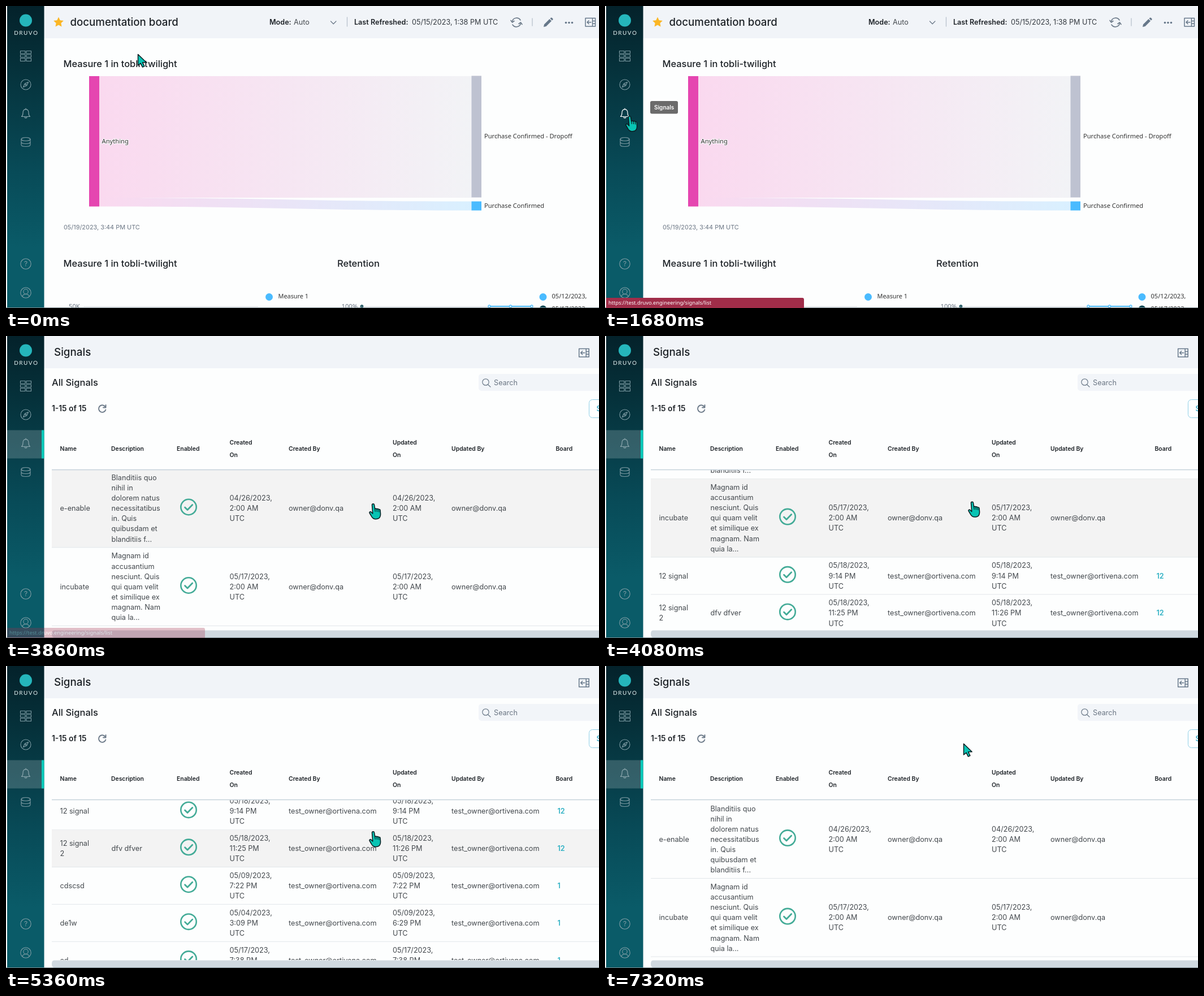
Animation, 1049 px wide and 534 px high, one loop 8300 ms. Source, as an HTML page:

```html
<!DOCTYPE html>
<html lang="en">
<head>
<meta charset="utf-8">
<title>Signals list</title>
<style>
html, body { margin: 0; width: 100%; height: 100%; overflow: hidden; background: #fff; }
svg { display: block; width: 100vw; height: 100vh; }
text { font-family: Inter, sans-serif; white-space: pre; }
.noto { font-family: "Noto Sans", "Open Sans", sans-serif; }
.line { fill: none; stroke-linecap: round; stroke-linejoin: round; }
</style>
</head>
<body>
<svg id="stage" viewBox="0 0 1049 534" xmlns="http://www.w3.org/2000/svg">
  <defs>
    <linearGradient id="side" x1="0" y1="0" x2="0" y2="1">
      <stop offset="0" stop-color="#04222b"/><stop offset=".15" stop-color="#052d36"/>
      <stop offset=".55" stop-color="#084b58"/><stop offset=".8" stop-color="#0a5b68"/>
      <stop offset="1" stop-color="#0a5b68"/>
    </linearGradient>
    <linearGradient id="drop"><stop offset="0" stop-color="#fad9ef"/><stop offset="1" stop-color="#f2f3f6"/></linearGradient>
    <linearGradient id="kept"><stop offset="0" stop-color="#fad9ef"/><stop offset="1" stop-color="#d9f0ff"/></linearGradient>
    <clipPath id="view"><rect x="68" y="237" width="981" height="283"/></clipPath>
  </defs>
  <rect width="1049" height="534" fill="#fdfefe"/>
  <rect x="67" width="982" height="57" fill="#f1f4f8"/>

  <g id="board">
    <path d="M93 19.5l2.7 5.7 6.2.8-4.5 4.3 1.1 6.2-5.5-3-5.5 3 1.1-6.2-4.5-4.3 6.2-.8z" fill="#fbb624"/>
    <g class="line" stroke="#6c7a89" stroke-width="1.3">
      <path d="M574.5 27l4.7 4.7 4.7-4.7"/>
      <path d="M603.5 20v16M931 22v13" stroke="#b9c2cc"/>
      <path d="M895.5 27a8 8 0 0 1 14.5-2M910.5 31a8 8 0 0 1-14.5 2" stroke-width="1.6"/>
      <path d="M893 25.5l2.5 3.5 3.5-2.5M913 32.5l-2.5-3.5-3.5 2.5" stroke-width="1.6"/>
    </g>
    <path d="M951 37l1-4.5 9.5-9.5 3.5 3.5-9.5 9.5zM962.5 22l1.5-1.3q1-.7 2 .3l1.2 1.2q1 1 .2 2l-1.4 1.3z" fill="#67788a"/>
    <g fill="#67788a"><circle cx="990.5" cy="29.5" r="1.8"/><circle cx="996" cy="29.5" r="1.8"/><circle cx="1001.5" cy="29.5" r="1.8"/></g>
    <rect x="165" y="124" width="659" height="215" fill="url(#drop)"/>
    <path d="M165 339C494 339 494 345.5 824 345.5V361.5C494 361.5 494 354.5 165 354.5Z" fill="url(#kept)"/>
    <rect x="147" y="124" width="18" height="230.5" fill="#e546b0"/>
    <rect x="823.5" y="123.5" width="17.5" height="215" fill="#bec2d1"/>
    <rect x="823.5" y="345.5" width="17.5" height="16" fill="#4abbff"/>
    <path d="M137 531.5H446M635 531.5H930" stroke="#dcdfe3"/>
    <circle cx="465.5" cy="514.5" r="6.5" fill="#4abbff"/>
    <circle cx="950" cy="514.5" r="6.5" fill="#4abbff"/>
    <circle cx="950" cy="536" r="6.5" fill="#0b4652"/>
    <path d="M855 531H930" stroke="#4abbff" stroke-width="2"/>
    <g fill="#fff" stroke="#4abbff" stroke-width="1.3"><circle cx="855" cy="531" r="2"/><circle cx="892.5" cy="531" r="2"/><circle cx="930" cy="531" r="2"/></g>
    <circle cx="629.5" cy="531" r="2" fill="#7b979d" stroke="#0b4652" stroke-width="1.5"/>
  </g>

  <g id="signals">
    <g id="list">
      <rect x="836" y="67" width="230" height="30" rx="5" fill="#f2f5f9"/>
      <g class="line" stroke="#6c7a89" stroke-width="1.2"><circle cx="848.5" cy="81.5" r="5.7"/><path d="M852.7 86l4.3 4"/></g>
      <path class="line" d="M175.5 125a6.3 6.3 0 1 0 .8 5.5M176.5 122v4.5h-4.5" stroke="#6c7a89" stroke-width="1.9"/>
      <rect x="1031.5" y="112.5" width="60" height="32" rx="6" fill="#fff" stroke="#8fcfe6"/>
      <g clip-path="url(#view)"><g id="rows"></g></g>
      <path d="M81 236.5H1049" stroke="#c5d1da" stroke-width="1.4"/>
      <path d="M1049 520.5H85q-4 0-4 6.2t4 6.2H1049z" fill="#d0d9e0"/>
    </g>
  </g>

  <g id="panel" class="line" stroke="#67788a" stroke-width="1.5">
    <path d="M0 0H17.5V14.5H0zM12.5 0V14.5M12.5 5H17.5M12.5 9.7H17.5M10 7.3H3M6 4.3L3 7.3l3 3"/>
  </g>

  <rect x="2" width="65.5" height="534" fill="url(#side)"/>
  <g id="active"><rect x="2" y="166.5" width="65.5" height="50" fill="#fff" opacity=".18"/><rect x="63" y="166.5" width="4.5" height="50" fill="#0bc9b9"/></g>
  <circle cx="35" cy="25.5" r="11" fill="#25b5bb"/>
  <g class="line" stroke="#7f9ca4" stroke-width="1.1">
    <path d="M25.5 79.5h8.5v4.5h-8.5zM36 79.5h8.5v4.5h-8.5zM25.5 86h8.5v4.5h-8.5zM36 86h8.5v4.5h-8.5zM25.5 92.5h8.5v5h-8.5zM36 92.5h8.5v5h-8.5z"/>
    <circle cx="35" cy="139" r="9"/><path d="M39.5 134.5l-2.7 6.3-6.3 2.7 2.7-6.3z"/><circle cx="35" cy="139" r="1"/>
    <ellipse cx="35" cy="235.5" rx="8" ry="3"/><path d="M27 235.5V245.5C27 249.5 43 249.5 43 245.5V235.5M27 240.5C27 244.5 43 244.5 43 240.5"/>
    <circle cx="35" cy="456" r="9.2"/>
    <circle cx="35" cy="507" r="9.2"/><circle cx="35" cy="505" r="4.2"/><path d="M28.5 513.5q2-4 6.5-4t6.5 4"/>
  </g>
  <path id="bell" class="line" stroke-width="1.2" d="M27.5 195.5q2.5-2 2.5-6.5 0-6 5-6.3 5 .3 5 6.3 0 4.5 2.5 6.5zM33 197q2 2 4 0M35 182.7v-1.5"/>

  <path d="M0 533.5H1049" stroke="#78878d"/>
  <g id="urlBar"><path id="bar" fill="#a02d49"/></g>
  <g id="tip"><rect x="80" y="168" width="49" height="22.5" rx="3" fill="#6b6b6b"/></g>
  <g id="mouse" fill="#08c4b4" stroke="#0a1c20" stroke-width="1.5" stroke-linejoin="round">
    <path id="arrow" d="M.5.5V20l4.6-3.7 3.4 6.9 3.4-1.7-3.3-6.7h6.6z"/>
    <g id="hand" transform="translate(-7 0)">
      <path d="M5.5 3c-.2-2.6 3.6-3 4-.4l1.2 7.6c.4-1.7 3-1.7 3.4.1.7-1.4 3-1 3.2.7.9-.9 2.7-.2 2.8 1.3l.5 6.7c0 4-2 7.5-5.5 8.3-4.5 1-8-.3-10-3.5l-4-6.8c-.9-1.8 1.4-3.2 2.9-1.7l2.7 2.7z"/>
      <path class="line" stroke-width="1.2" d="M10.7 10.2l.5 4M14.1 10.5l.4 4M17.3 11.5l.4 3.5"/>
    </g>
  </g>
</svg>
<script>
(() => {
const NS = "http://www.w3.org/2000/svg";
const $ = id => document.getElementById(id);
const LOOP = 8300;
const INK = "#1d2227", BODY = "#43484d", GREY = "#6b7684";

function add(parent, tag, attrs, text) {
  const el = document.createElementNS(NS, tag);
  for (const k in attrs) el.setAttribute(k, attrs[k]);
  if (text !== undefined) el.textContent = text;
  parent.appendChild(el);
  return el;
}

// y is the middle of the capitals
function label(parent, x, y, text, size, weight = 400, fill = INK, more = {}) {
  return add(parent, "text", { x, y: y + size * 0.36, "font-size": size, "font-weight": weight, fill, ...more }, text);
}

const noto = { class: "noto" };
const board = $("board"), list = $("list"), stage = $("stage");

label(board, 113.5, 28.5, "documentation board", 18.7, 500);
label(board, 466, 28.5, "Mode:", 12.6, 600);
label(board, 509, 28.5, "Auto", 12.6, 400, BODY);
label(board, 616, 28.5, "Last Refreshed:", 12.6, 600);
label(board, 718, 28.5, "05/15/2023, 1:38 PM UTC", 12.6, 400, "#33393f");
for (const y of [102, 455.5]) label(board, 101.5, y, "Measure 1 in tobli-twilight", 16.4, 500);
label(board, 586, 455.5, "Retention", 16.5, 500);
label(board, 102, 391.5, "05/19/2023, 3:44 PM UTC", 10.9, 400, GREY);
label(board, 169.5, 238.5, "Anything", 11.2, 400, "#333", { ...noto, stroke: "#fff", "stroke-width": 2, "paint-order": "stroke" });
label(board, 846, 230.5, "Purchase Confirmed - Dropoff", 11.1, 400, "#333", noto);
label(board, 846, 353, "Purchase Confirmed", 11.1, 400, "#333", noto);
label(board, 481.5, 513.5, "Measure 1", 10.9, 400, "#333", noto);
label(board, 965.5, 513.5, "05/12/2023,", 11.1, 400, "#333", noto);
label(board, 965.5, 535, "05/17/2023,", 11.1, 400, "#333", noto);
label(board, 111, 530.5, "50K", 11.2, 400, GREY, noto);
label(board, 593.5, 530.5, "100%", 11.2, 400, GREY, noto);

label($("signals"), 85, 28.5, "Signals", 18.8, 500);
label(list, 81, 82.5, "All Signals", 16.5, 500);
label(list, 81, 128.5, "1-15 of 15", 13.8, 600);
label(list, 863, 82, "Search", 12.7, 400, GREY);
label(list, 1044.5, 128.5, "S", 12.5, 500, "#2ba3c4");

const heads = [[95.5, "Name"], [186, "Description"], [302, "Enabled"], [395.5, "Created", "On"],
  [500, "Created By"], [684, "Updated", "On"], [788, "Updated By"], [972.5, "Board"]];
for (const [x, ...lines] of heads)
  lines.forEach((s, i) => label(list, x, 199 + (i - (lines.length - 1) / 2) * 22, s, 10.4, 600));

label(stage, 35.8, 47, "DRUVO", 10, 400, "#e8f3f3", { "letter-spacing": 1.5, "text-anchor": "middle", style: "font-family:Lato,sans-serif" });
label(stage, 35, 456, "?", 12, 400, "#7f9ca4", { "text-anchor": "middle" });
label($("tip"), 87, 179.5, "Signals", 10, 600, "#fff");
label($("urlBar"), 6, 525, "https://test.druvo.engineering/signals/list", 9.3, 400, "#fff", noto);
stage.append($("urlBar"), $("tip"), $("mouse"));

// name, description, created, updated, owner, board, height
const OWNER = "owner@donv.qa", TESTER = "test_owner@ortivena.com";
const day = (d, h) => `05/${d}/2023,|${h}|UTC`;
const small = (name, text, made, changed, count) => [name, text, made, changed, TESTER, count, 65.9];
const april = "04/26/2023,|2:00 AM|UTC", may = day("17", "2:00 AM");
const data = [
  ["e-enable", "Blanditiis quo|nihil in|dolorem natus|necessitatibus|in. Quis|quibusdam et|blanditiis f...", april, april, OWNER, "", 138.5],
  ["incubate", "Magnam id|accusantium|nesciunt. Quis|qui quam velit|et similique ex|magnam. Nam|quia la...", may, may, OWNER, "", 138.5],
  small("12 signal", "", day("18", "9:14 PM"), day("18", "9:14 PM"), "12"),
  small("12 signal|2", "dfv dfver", day("18", "11:25 PM"), day("18", "11:26 PM"), "12"),
  small("cdscsd", "", day("09", "7:22 PM"), day("09", "7:22 PM"), "1"),
  small("de1w", "", day("04", "3:09 PM"), day("09", "6:29 PM"), "1"),
  small("ed", "", day("17", "7:38 PM"), day("17", "7:38 PM"), "1"),
  small("ed 2", "", day("17", "7:41 PM"), day("17", "7:41 PM"), "1"),
  small("fgh", "", day("17", "7:52 PM"), day("17", "7:52 PM"), "1")
];

let nextTop = 237;
const rows = data.map(([name, text, made, changed, owner, count, height]) => {
  const g = $("rows"), top = nextTop, end = top + height, mid = top + height / 2;
  const back = add(g, "rect", { x: 81, y: top, width: 968, height, fill: "#f3f3f3" });
  const cell = (x, s) => s.split("|").forEach((line, i, all) =>
    label(g, x, mid + (i - (all.length - 1) / 2) * 18.1, line, 12.65, 400, BODY));
  cell(95.5, name);
  cell(186.5, text);
  cell(395.5, made);
  cell(500, owner);
  cell(684, changed);
  cell(788, owner);
  label(g, 975.5, mid, count, 12.6, 600, "#2fb1c4");
  const c = mid - 2.2;
  add(g, "circle", { cx: 323, cy: c, r: 13.7, fill: "none", stroke: "#43ab97", "stroke-width": 2.6 });
  add(g, "path", { class: "line", d: `M316.5 ${c + 0.5}l4.5 4.5 8.7-9`, stroke: "#43ab97", "stroke-width": 2.8 });
  add(g, "path", { d: `M81 ${end}H1049`, stroke: "#e2e7ea" });
  nextTop = end;
  return { back, top, end };
});

// time, x, y of the pointer's hot spot
const pathKeys = [[30, 233, 85], [860, 34, 240], [880, 34, 240], [1150, 43, 194], [2200, 43, 194], [2450, 46, 196],
  [2940, 46, 196], [3760, 649, 296], [3880, 649, 296], [4130, 649, 292], [5770, 649, 292], [5920, 639, 292],
  [6430, 639, 292], [6800, 343, 235], [7200, 622, 157], [7300, 622, 157], [7320, 634, 137]];
const scrollKeys = [[3840, 0], [3860, 1], [4130, 150], [4500, 150], [4760, 325.5], [5020, 440],
  [5160, 440], [5630, 90], [5770, 90], [5920, 0]];
const barKeys = [[1640, 190], [1680, 350]];
const barFade = [[1290, 0], [1380, 1], [3720, 1], [3920, 0]];
const listFade = [[2470, 0], [2660, 1]];

const linear = u => u, smooth = u => u * u * (3 - 2 * u);
function at(keys, t, ease = linear) {
  const i = keys.findIndex(k => k[0] > t);
  if (i === 0) return keys[0].slice(1);
  if (i < 0) return keys[keys.length - 1].slice(1);
  const a = keys[i - 1], b = keys[i], u = ease((t - a[0]) / (b[0] - a[0]));
  return a.slice(1).map((v, n) => v + (b[n + 1] - v) * u);
}
const show = (id, on) => $(id).setAttribute("display", on ? "inline" : "none");

function draw(t) {
  const [x, y] = at(pathKeys, t, smooth), [scroll] = at(scrollKeys, t);
  const onSignals = t >= 1900, overBell = t >= 1060 && t < 3040;
  show("board", !onSignals);
  show("signals", onSignals);
  show("active", onSignals);
  show("tip", overBell);
  $("bell").setAttribute("stroke", overBell ? "#fff" : "#8aa5ac");
  $("panel").setAttribute("transform", onSignals ? "translate(1013.7 22.5)" : "translate(1025 21.5)");
  list.setAttribute("opacity", at(listFade, t)[0]);

  const right = 2 + at(barKeys, t)[0];
  $("bar").setAttribute("d", `M2 516H${right - 3}q3 0 3 3V534H2z`);
  $("urlBar").setAttribute("opacity", at(barFade, t)[0]);

  $("rows").setAttribute("transform", `translate(0 ${-scroll})`);
  const hoverY = t >= 3850 && t < 5910 ? y + scroll : -1;
  for (const r of rows) r.back.setAttribute("opacity", hoverY >= r.top && hoverY < r.end ? 1 : 0);

  const isHand = x < 68 || (onSignals && y > 237);
  show("hand", isHand);
  show("arrow", !isHand);
  $("mouse").setAttribute("transform", `translate(${x} ${y})`);
}

const start = performance.now();
function tick() {
  draw((performance.now() - start) % LOOP);
  requestAnimationFrame(tick);
}
tick();
})();
</script>
</body>
</html>
```
